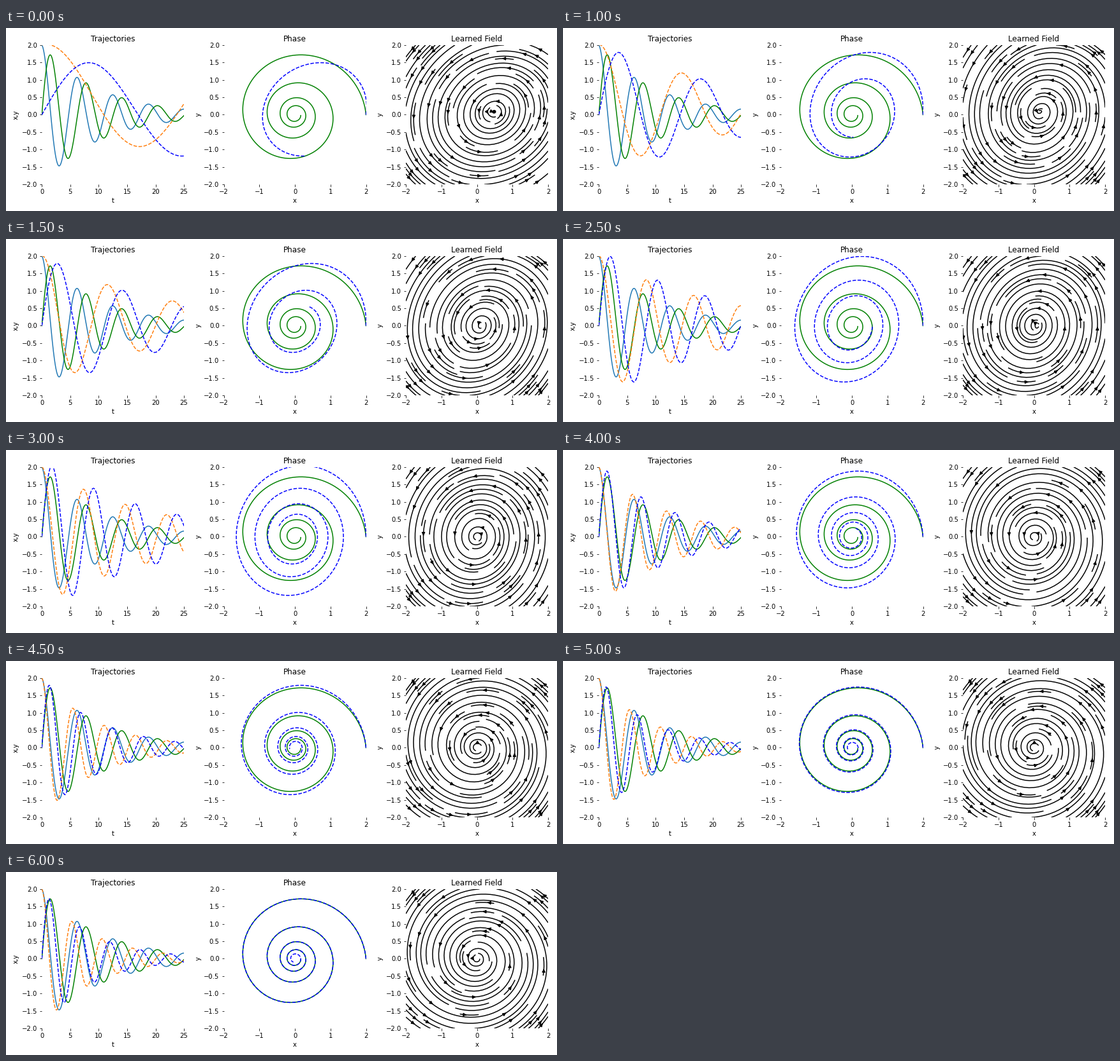
A matplotlib script for the animation above (6.5 s loop, 864 by 288 pixels).

```python
import numpy as np
import matplotlib.pyplot as plt
from matplotlib.animation import FuncAnimation

plt.rcParams["font.family"] = "DejaVu Sans"

FRAMES, INTERVAL = 13, 500
T = np.linspace(0, 25, 1000)
START = np.array([2.0, 0.0])


def falling(i, middle, steepness):
    """Smooth step from one down to zero."""
    return 1 / (1 + np.exp(steepness * (i - middle)))


def learned_system(i):
    """Decay, angular speed, fixed point and quadrature vector at step i."""
    early = np.exp(-1.3 * i)
    overshoot = np.exp(-((i - 6) / 2.5) ** 2)
    speed = np.interp(i, [0, 2, 3, 7, 9, 12],
                      [0.1916, 0.4375, 0.55, 0.961, 1.14, 1.177])
    decay = speed * (0.1 - 0.061 * early - 0.039 * overshoot)
    center = np.array([0.463 * max(0, 1 - i / 6) ** 2.3,
                       0.072 * falling(i, 2.5, 8)])
    quad = np.array([0.3 * falling(i, 5.5, 0.8),
                     2 - 0.49 * early + 0.24 * overshoot])
    return decay, speed, center, quad


def trajectory(decay, speed, center, quad):
    offset = START - center
    wave = np.outer(offset, np.cos(speed * T)) + np.outer(quad, np.sin(speed * T))
    return center[:, None] + np.exp(-decay * T) * wave


def field(decay, speed, center, quad):
    """Unit vectors of the linear system around its fixed point."""
    basis = np.column_stack([START - center, quad])
    spin = np.array([[-decay, -speed], [speed, -decay]])
    matrix = basis @ spin @ np.linalg.inv(basis)
    gy, gx = np.mgrid[-2:2:21j, -2:2:21j]
    u, v = np.tensordot(matrix, [gx - center[0], gy - center[1]], axes=1)
    size = np.hypot(u, v) + 1e-9
    return gx, gy, u / size, v / size


def style(ax, title, xlabel, ylabel, xlim):
    ax.set(title=title, xlabel=xlabel, ylabel=ylabel, xlim=xlim, ylim=(-2, 2))
    for spine in ax.spines.values():
        spine.set_visible(False)


def style_field():
    style(ax_field, "Learned Field", "x", "y", (-2, 2))


fig, (ax_time, ax_phase, ax_field) = plt.subplots(1, 3, figsize=(12, 4), dpi=72)
style(ax_time, "Trajectories", "t", "x,y", (0, 25))
style(ax_phase, "Phase", "x", "y", (-2, 2))
style_field()
fig.tight_layout()

true_x, true_y = trajectory(0.1, 1.0, np.zeros(2), np.array([0.0, 2.0]))
ax_time.plot(T, true_x, "C0-", T, true_y, "g-")
ax_phase.plot(true_x, true_y, "g-")
line_x, line_y = ax_time.plot(T, true_x, "C1--", T, true_y, "b--")
line_phase, = ax_phase.plot(true_x, true_y, "b--")


def update(i):
    system = learned_system(i)
    x, y = trajectory(*system)
    line_x.set_ydata(x)
    line_y.set_ydata(y)
    line_phase.set_data(x, y)
    ax_field.clear()
    ax_field.streamplot(*field(*system), color="black")
    style_field()
    return []


anim = FuncAnimation(fig, update, frames=FRAMES, interval=INTERVAL,
                     repeat=True, repeat_delay=0)
plt.show()
```
